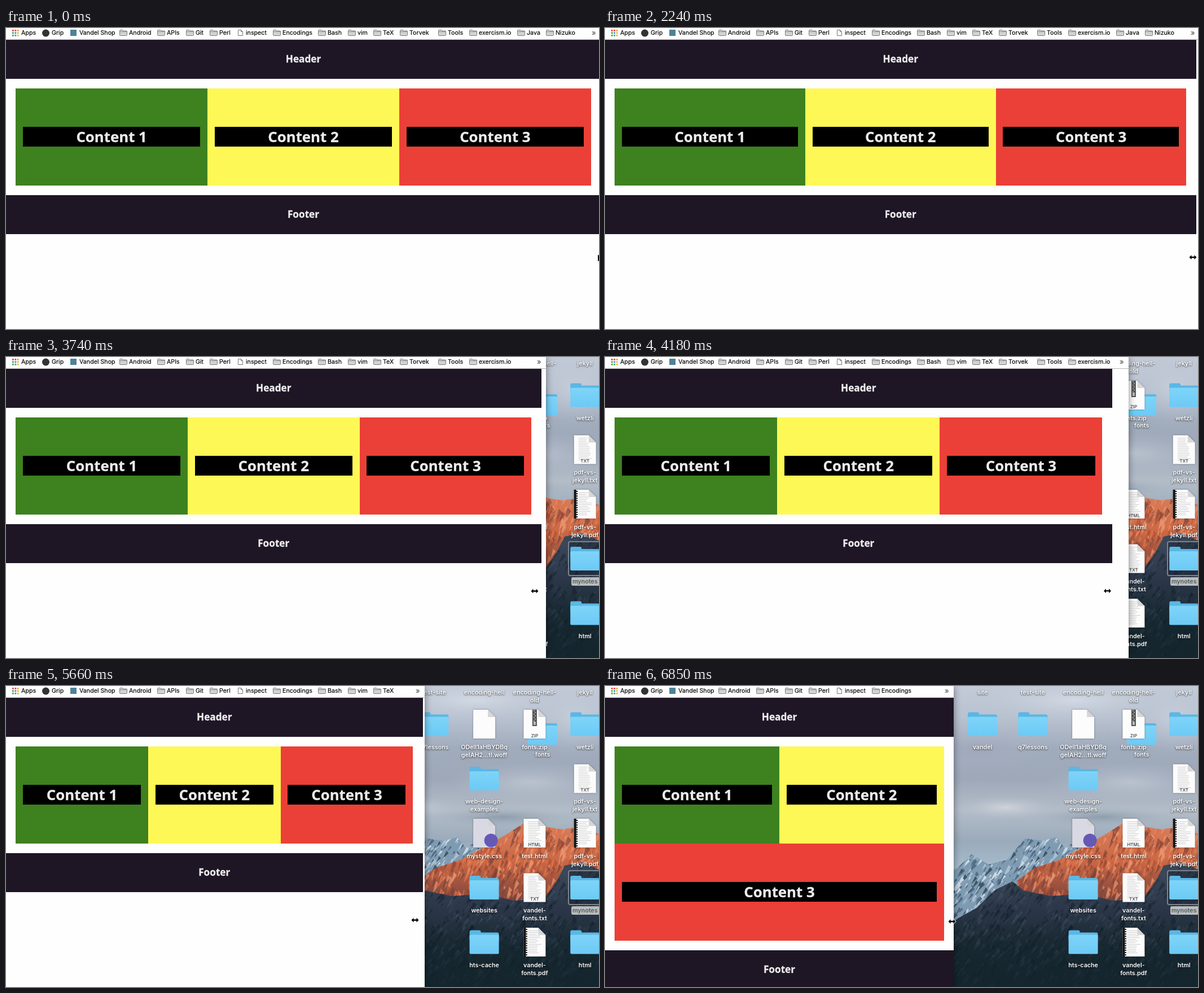
An HTML page with a canvas that plays this animation: 1051x533 px, repeating every 8000 ms.

```html
<!DOCTYPE html>
<html lang="en">
<head>
<meta charset="utf-8">
<title>Responsive columns</title>
<style>
  html, body { margin: 0; width: 100%; height: 100%; overflow: hidden; background: #fefefe; }
  #desk, #win, #cursor { position: absolute; left: 0; top: 0; }
  #win { height: 533px; overflow: hidden; background: #fefefe; }
  #shade { position: absolute; top: 0; left: 0; height: 533px; box-shadow: 0 0 12px rgba(0,0,0,.45); }
  #bar { height: 20px; border-bottom: 1px solid #b5b5b5; font: 10.7px/17px Inter, Roboto, sans-serif; color: #000; -webkit-text-stroke: .15px; }
  #bar span, #bar svg { position: absolute; top: 0; white-space: nowrap; }
  #bar svg { left: -17px; overflow: visible; }
  #bar #more { font-size: 13px; line-height: 16px; color: #555; }
  #page { position: absolute; left: 0; top: 21px; font: bold 17.2px "Open Sans", "Noto Sans", sans-serif; color: #ececec; text-align: center; -webkit-text-stroke: .3px; }
  .band { height: 68.8px; line-height: 68.8px; background: #1e1525; }
  main { display: flex; flex-wrap: wrap; margin: 17.2px; }
  main div { box-sizing: border-box; width: 33.3333%; height: 172px; padding: 0 12.9px; display: flex; align-items: center; }
  main p { margin: 0; width: 100%; font-size: 25.8px; line-height: 35px; background: #000; white-space: nowrap; }
  .narrow div { width: 50%; }
  .narrow div:last-child { width: 100%; }
  #cursor { overflow: visible; fill: #000; stroke: #fff; stroke-width: 1.6px; paint-order: stroke; }
</style>
</head>
<body>
<canvas id="desk" width="1051" height="533"></canvas>
<div id="shade"></div>
<div id="win">
  <div id="bar"><span id="more">»</span></div>
  <div id="page">
    <div class="band">Header</div>
    <main id="main">
      <div style="background:#3e811f"><p>Content 1</p></div>
      <div style="background:#fef856"><p>Content 2</p></div>
      <div style="background:#eb4037"><p>Content 3</p></div>
    </main>
    <div class="band">Footer</div>
  </div>
</div>
<svg id="cursor" width="1" height="1"><path id="shape"/></svg>
<script>
const $ = id => document.getElementById(id);
const c = $('desk').getContext('2d');

// Desktop picture
let seed = 7;
const rand = () => (seed = seed * 16807 % 2147483647) / 2147483647;

function trace(points) {
  c.beginPath();
  for (let i = 0; i < points.length; i += 2) c.lineTo(points[i], points[i + 1]);
  c.closePath();
}

function fade(y0, y1, ...colors) {
  const g = c.createLinearGradient(0, y0, 0, y1);
  colors.forEach((col, i) => g.addColorStop(i / (colors.length - 1), col));
  return g;
}

// A mountain: flat outline roughened by slanted random slivers
function rock(points, fill, accents, count, size, lean) {
  const xs = points.filter((_, i) => i % 2 === 0), ys = points.filter((_, i) => i % 2);
  const x0 = Math.min(...xs), y0 = Math.min(...ys);
  const w = Math.max(...xs) - x0, h = Math.max(...ys) - y0;
  c.save();
  trace(points);
  c.fillStyle = fill;
  c.fill();
  c.clip();
  for (let i = 0; i < count; i++) {
    const x = x0 + rand() * w, y = y0 + rand() * h, s = size * (.4 + rand());
    c.fillStyle = accents[i % accents.length];
    trace([x, y, x + s * .25, y + s * .3, x + lean * s, y + s]);
    c.fill();
  }
  c.restore();
}

function cloud(x, y, rx, ry, color) {
  c.save();
  c.translate(x, y);
  c.scale(rx, ry);
  const g = c.createRadialGradient(0, 0, 0, 0, 0, 1);
  g.addColorStop(0, color);
  g.addColorStop(1, 'rgba(180,190,205,0)');
  c.fillStyle = g;
  c.fillRect(-1, -1, 2, 2);
  c.restore();
}

function wallpaper() {
  c.fillStyle = fade(0, 330, '#c3cbd8', '#b9c2d0', '#a0abbc', '#9ea8b9', '#b3bdc8', '#9aaaba', '#a8bfd0');
  c.fillRect(600, 0, 451, 533);
  cloud(830, 25, 200, 45, 'rgba(218,225,234,.7)');
  cloud(660, 110, 130, 40, 'rgba(160,164,184,.5)');
  cloud(710, 215, 90, 22, 'rgba(215,218,222,.8)');
  cloud(930, 170, 150, 36, 'rgba(205,211,220,.6)');
  cloud(1010, 60, 90, 70, 'rgba(208,215,226,.6)');
  cloud(880, 232, 150, 22, 'rgba(120,137,155,.6)');
  rock([600, 335, 625, 322, 650, 298, 680, 316, 712, 308, 745, 270, 775, 274, 800, 268, 815, 287, 850, 265, 870, 400, 760, 400, 600, 440],
    '#7f9bb2', ['#c9d8e3', '#536e86', '#a9c0d1', '#88a4ba', '#40566b'], 900, 13, -.5);
  rock([730, 345, 762, 322, 805, 308, 850, 284, 895, 258, 922, 240, 950, 248, 985, 254, 1015, 250, 1051, 262, 1051, 330, 975, 360, 958, 382, 740, 378],
    fade(240, 380, '#d9805e', '#cb6844', '#7c443d'),
    ['rgba(236,150,112,.7)', 'rgba(170,78,52,.6)', 'rgba(224,116,76,.7)', 'rgba(120,66,58,.6)'], 800, 17, -.25);
  rock([600, 430, 628, 410, 660, 392, 690, 362, 722, 346, 742, 362, 790, 372, 850, 368, 900, 380, 955, 376, 975, 348, 990, 318, 1020, 312, 1051, 325, 1051, 533, 600, 533],
    fade(330, 533, '#3a4759', '#2a3647', '#182932', '#13252d'),
    ['rgba(78,94,114,.3)', 'rgba(14,22,34,.35)', 'rgba(60,74,92,.25)', 'rgba(16,30,38,.4)'], 1100, 15, -.5);
  c.fillStyle = fade(420, 533, 'rgba(20,37,45,0)', 'rgba(20,37,45,.85)');
  c.fillRect(600, 420, 451, 113);
}

function folder(x, y) {
  c.fillStyle = '#5ab7e4';
  c.beginPath();
  c.roundRect(x - 26, y - 21, 20, 12, 3);
  c.roundRect(x - 26, y - 17, 52, 14, 3);
  c.fill();
  c.fillStyle = fade(y - 14, y + 21, '#7fd4f8', '#6ccaf5');
  c.beginPath();
  c.roundRect(x - 26, y - 13, 52, 34, 2);
  c.fill();
}

function sheet(x, y, kind) {
  const l = x - 19.5, t = y - 25.5;
  c.shadowColor = 'rgba(0,0,0,.4)';
  c.shadowBlur = 3;
  c.fillStyle = kind === 'css' ? '#d9d9e4' : '#fcfcfc';
  trace([l, t, l + 26, t, l + 39, t + 13, l + 39, t + 51, l, t + 51]);
  c.fill();
  c.shadowBlur = 0;
  c.fillStyle = '#d6d6d6';
  trace([l + 26, t, l + 39, t + 13, l + 26, t + 13]);
  c.fill();
  if (/TXT|HTML|PDF/.test(kind)) {
    c.fillStyle = '#c4c4c4';
    for (let i = 0; i < 14; i++) c.fillRect(l + 8, t + 5 + i * 3, (i < 4 ? 12 : 14) + rand() * 10, .8);
  }
  if (kind === 'PDF') {
    c.fillStyle = '#111';
    c.fillRect(l, t, 4, 51);
    for (let i = 0; i < 12; i++) c.fillRect(l + 4, t + 2 + i * 4.1, 2.5, 2);
  } else if (kind === 'css') {
    c.fillStyle = '#6659b5';
    c.beginPath();
    c.arc(x + 12, y + 13, 12, 0, 7);
    c.fill();
  } else if (kind !== 'blank') {
    c.fillStyle = '#444';
    c.font = '500 8px Inter, sans-serif';
    c.fillText(kind, x, y + 21);
  }
  if (kind === 'ZIP') {
    c.fillStyle = '#555';
    c.fillRect(x - 4, t, 8, 29);
    c.fillStyle = '#bbb';
    for (let i = 0; i < 7; i++) c.fillRect(x - 2 + i % 2 * 2, t + 1 + i * 3, 2, 1.5);
    c.fillRect(x - 2, t + 21, 4, 6);
  }
}

function label(x, y, text, color = '#fff') {
  c.font = '600 10.7px Inter, Roboto, sans-serif';
  c.fillStyle = color;
  if (color === '#fff') {
    c.shadowColor = 'rgba(0,0,0,.8)';
    c.shadowBlur = 3;
    c.shadowOffsetY = 1;
  }
  text.split('|').forEach((line, i) => c.fillText(line, x, y + i * 14));
  c.shadowBlur = c.shadowOffsetY = 0;
}

// Column, row, kind, name
const files = [
  [0, 0, '', 'site'], [1, 0, '', 'test-site'], [2, 0, '', 'encoding-hell'],
  [3, 0, '', 'encoding-hell-|old'], [4, 0, '', 'jekyll'],
  [0, 1, 'folder', 'vandel'], [1, 1, 'folder', 'q7lessons'],
  [2, 1, 'blank', 'ODelI1aHBYDBq|geIAH2...tl.woff'], [3, 1, 'ZIP', 'fonts.zip'], [4, 1, 'folder', 'wetzli'],
  [2, 2, 'folder', 'web-design-|examples'], [4, 2, 'TXT', 'pdf-vs-|jekyll.txt'],
  [2, 3, 'css', 'mystyle.css'], [3, 3, 'HTML', 'test.html'], [4, 3, 'PDF', 'pdf-vs-|jekyll.pdf'],
  [2, 4, 'folder', 'websites'], [3, 4, 'TXT', 'vandel-|fonts.txt'], [4, 4, 'folder', 'mynotes'],
  [2, 5, 'folder', 'hts-cache'], [3, 5, 'PDF', 'vandel-|fonts.pdf'], [4, 5, 'folder', 'html']
];

function desktop() {
  wallpaper();
  c.textAlign = 'center';
  c.textBaseline = 'middle';
  folder(951, 83);
  label(951, 122, 'fonts');
  for (const [col, row, kind, name] of files) {
    const x = 669 + col * 89.3, y = 67.5 + (row - 1) * 96.5, chosen = name === 'mynotes';
    if (chosen) {
      c.fillStyle = 'rgba(20,28,40,.4)';
      c.strokeStyle = '#7b838c';
      c.lineWidth = 2;
      c.beginPath();
      c.roundRect(997, 327, 59, 60, 3);
      c.fill();
      c.stroke();
      c.fillStyle = '#b9bdbd';
      c.beginPath();
      c.roundRect(1002, 390, 52, 15, 3);
      c.fill();
    }
    if (kind === 'folder') folder(x, y);
    else if (kind) sheet(x, y, kind);
    label(x, y + 41, name, chosen ? '#555b5f' : '#fff');
  }
}
desktop();

// Bookmarks bar
const dots = ['#e2453c', '#e2453c', '#ee9a30', '#3aa757', '#4285e0', '#f0b429', '#3aa757', '#3aa757', '#f0b429'];
const icons = {
  apps: dots.map((d, i) => `<rect x="${1 + i % 3 * 4.4}" y="${3 + (i / 3 | 0) * 4.4}" width="2.8" height="2.8" fill="${d}"/>`).join(''),
  disc: '<circle cx="6.5" cy="9" r="6.5" fill="#333"/>',
  square: '<rect x="1" y="3" width="11" height="11" fill="#4d8296"/>',
  page: '<path d="M3.5 3.5h5l3 3v7h-8zM8.5 3.5v3h3" fill="#fff" stroke="#777"/>',
  folder: '<path d="M.5 12.500v-8q0-1 1-1h4l1.500 1.500h5.500q1 0 1 1v6.500q0 1-1 1h-11q-1 0-1-1z" fill="#d2d2d2" stroke="#7c7c7c"/><path d="M1 6.500h12" stroke="#8a8a8a"/>'
};
const marks = [
  [27, 'Apps', 'apps'], [81, 'Grip', 'disc'], [130, 'Vandel Shop', 'square'], [218, 'Android'], [285, 'APIs'],
  [336, 'Git'], [378, 'Perl'], [425, 'inspect', 'page'], [490, 'Encodings'], [570, 'Bash'], [623, 'vim'],
  [668, 'TeX'], [715, 'Torvek'], [783, 'Tools'], [838, 'exercism.io'], [923, 'Java'], [974, 'Nizuko']
];
const tabs = marks.map(([x, name, icon = 'folder']) => {
  const el = document.createElement('span');
  el.style.left = x + 'px';
  el.innerHTML = `<svg width="14" height="17">${icons[icon]}</svg>${name}`;
  $('bar').append(el);
  return el;
});

// Step, window edge, page width, pointer x, pointer y
const keys = [
  [0, 1054, 1047.5, 1042, 406], [6, 1049, 1036, 1030, 409], [10, 957, 948.5, 937, 414.5],
  [14, 918, 882, 875, 414], [17, 838, 838, 821, 413.5], [21, 788, 756, 748, 414],
  [22, 788, 756, 748, 414], [23, 742, 738.5, 725, 414.5], [28, 672, 661, 640, 415.5],
  [30, 660, 632, 618, 417], [31, 618, 618, 615, 417]
];
const DRAG = 2240, STEP = 148.5;
const ARROW = 'M-2 -8V4.500L.8 2 3 7 5 6 3 1.500H7z';
const RESIZE = 'M-6.500 0L-2.500 -4V-1.200H2.500V-4L6.500 0 2.500 4V1.200H-2.500V4z';

function pose(step) {
  const i = Math.max(1, keys.findIndex(k => k[0] >= step));
  const a = keys[i - 1], b = keys[i], f = (step - a[0]) / (b[0] - a[0]);
  return a.slice(1).map((v, j) => v + (b[j + 1] - v) * f);
}

function draw(t) {
  const dragging = t >= DRAG;
  const [edge, width, x, y] = dragging
    ? pose(Math.min(31, Math.floor((t - DRAG) / STEP)))
    : [1054, 1054, 1051, 409];
  const resize = t >= 1190 || t >= 140 && t < 290 || t >= 590 && t < 740;
  $('win').style.width = $('shade').style.width = Math.round(edge) + 'px';
  $('page').style.width = width + 'px';
  $('main').className = width < 640 ? 'narrow' : '';
  $('more').style.left = Math.round(edge) - 16 + 'px';
  tabs.forEach((el, i) => {
    const next = i + 1 < marks.length ? marks[i + 1][0] : 1038;
    el.style.visibility = next <= edge + 1 ? 'visible' : 'hidden';
  });
  $('shape').setAttribute('d', resize ? RESIZE : ARROW);
  $('cursor').style.transform = `translate(${x}px, ${y}px)`;
}

function tick() {
  draw(performance.now() % 8000);
  requestAnimationFrame(tick);
}
tick();
</script>
</body>
</html>
```
